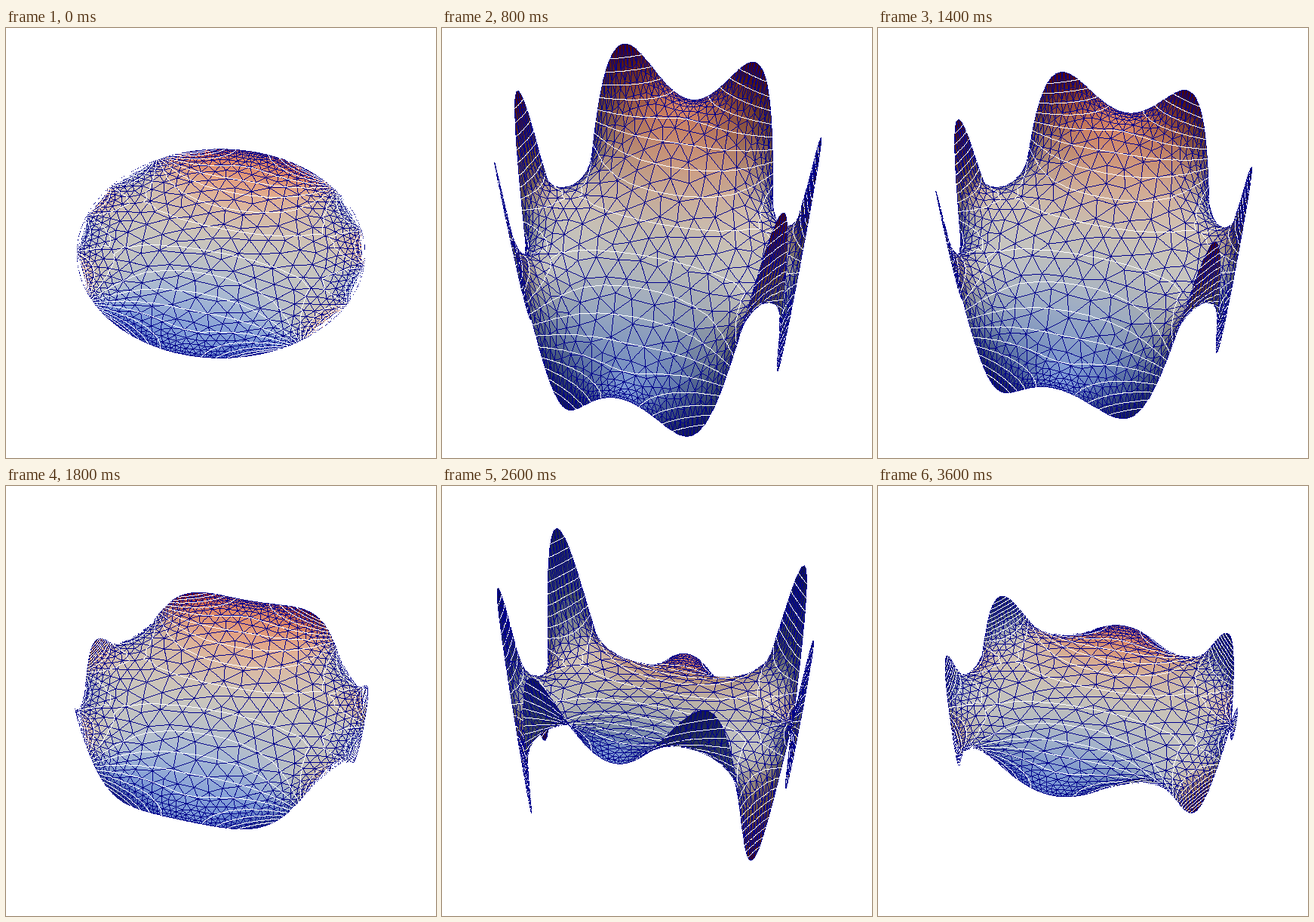
These frames come from a looping animation (570x570 px, 3800 ms). An HTML page with a canvas:

```html
<!DOCTYPE html>
<html>
<head>
<meta charset="utf-8">
<style>
  html, body { margin: 0; width: 100%; height: 100%; overflow: hidden; background: #fff; }
  canvas { display: block; }
</style>
</head>
<body>
<canvas id="stage" width="570" height="570"></canvas>
<script>
const SIZE = 570, STEPS = 19, STEP_MS = 200;
const ctx = document.getElementById('stage').getContext('2d');
const image = ctx.createImageData(SIZE, SIZE);
const pixels = new Uint32Array(image.data.buffer);
const nearness = new Float32Array(SIZE * SIZE);
const rgb = (r, g, b) => (255 << 24 | b << 16 | g << 8 | r) >>> 0;
const WHITE = rgb(255, 255, 255), NAVY = rgb(0, 0, 140);

let seed = 12345;
const random = () => (seed = (seed * 1664525 + 1013904223) % 4294967296) / 4294967296;

const dot = (a, b) => a[0] * b[0] + a[1] * b[1] + a[2] * b[2];
const minus = (a, b) => a.map((t, i) => t - b[i]);
const cross = (a, b) => [
  a[1] * b[2] - a[2] * b[1], a[2] * b[0] - a[0] * b[2], a[0] * b[1] - a[1] * b[0]
];

// Mesh points on jittered rings, finest at the rim; rim points come last.
function diskPoints() {
  const points = [];
  let r = 1;
  while (r > 0.05) {
    const h = Math.min(0.14, 0.025 + 0.3 * (1 - r));
    const n = Math.round(2 * Math.PI * r / h), start = random() * 7;
    const jitter = r === 1 ? 0 : 0.35 * h;
    for (let i = 0; i < n; i++) {
      const a = start + i * 2 * Math.PI / n;
      points.push([
        r * Math.cos(a) + (random() - 0.5) * jitter,
        r * Math.sin(a) + (random() - 0.5) * jitter
      ]);
    }
    r -= 0.87 * h;
  }
  return points.reverse();
}

// Bowyer-Watson Delaunay triangulation.
function triangulate(points) {
  const n = points.length;
  const all = [...points, [-150, -100], [150, -100], [0, 200]];
  const withCircle = (a, b, c) => {
    const [ax, ay] = all[a];
    const bx = all[b][0] - ax, by = all[b][1] - ay;
    const cx = all[c][0] - ax, cy = all[c][1] - ay;
    const d = 2 * (bx * cy - by * cx), bb = bx * bx + by * by, cc = cx * cx + cy * cy;
    const x = (cy * bb - by * cc) / d, y = (bx * cc - cx * bb) / d;
    return { v: [a, b, c], x: ax + x, y: ay + y, rr: x * x + y * y };
  };
  let triangles = [withCircle(n, n + 1, n + 2)];
  for (let p = 0; p < n; p++) {
    const [x, y] = all[p], kept = [], border = new Map();
    for (const t of triangles) {
      if ((x - t.x) ** 2 + (y - t.y) ** 2 >= t.rr) { kept.push(t); continue; }
      t.v.forEach((a, i) => {
        const b = t.v[(i + 1) % 3];
        if (!border.delete(b + ',' + a)) border.set(a + ',' + b, [a, b]);
      });
    }
    for (const [a, b] of border.values()) kept.push(withCircle(a, b, p));
    triangles = kept;
  }
  return triangles.map(t => t.v).filter(v => v.every(i => i < n));
}

// Rim heights sin(2 pi (x + y)) in axes turned by TURN against the view.
const TURN = 30.6 * Math.PI / 180;
const rimHeight = (x, y) => {
  const a = Math.atan2(y, x) - TURN;
  return Math.sin(2 * Math.PI * (Math.cos(a) + Math.sin(a)));
};

const vertices = diskPoints().map(([x, y]) => [x, y, 0]);
const triangles = triangulate(vertices);
const edgeKey = (a, b) => Math.min(a, b) * 10000 + Math.max(a, b);
const edgeIndex = new Map();
for (const v of triangles) v.forEach((a, i) => {
  const key = edgeKey(a, v[(i + 1) % 3]);
  if (!edgeIndex.has(key)) edgeIndex.set(key, edgeIndex.size);
});
const edges = [...edgeIndex.keys()].map(e => [Math.floor(e / 10000), e % 10000]);
const links = vertices.map(() => []);
edges.forEach(([a, b], e) => { links[a].push([b, e]); links[b].push([a, e]); });
const onRim = vertices.map(([x, y]) => Math.hypot(x, y) > 0.99999);

// Even out the inner triangles.
for (let pass = 0; pass < 3; pass++) {
  vertices.forEach((p, i) => {
    if (onRim[i]) return;
    for (const m of [0, 1]) {
      const mean = links[i].reduce((sum, [j]) => sum + vertices[j][m], 0) / links[i].length;
      p[m] += 0.5 * (mean - p[m]);
    }
  });
}

// Minimal surface over the disk: finite elements, reweighted by the slope, with SOR sweeps.
function solveMinimalSurface() {
  vertices.forEach((p, i) => { if (onRim[i]) p[2] = rimHeight(p[0], p[1]); });
  const corners = triangles.flatMap(v => v.map((k, i) => {
    const a = v[(i + 1) % 3], b = v[(i + 2) % 3];
    const [x, y] = vertices[k];
    const ax = vertices[a][0] - x, ay = vertices[a][1] - y;
    const bx = vertices[b][0] - x, by = vertices[b][1] - y;
    const area = Math.abs(ax * by - ay * bx);
    return { edge: edgeIndex.get(edgeKey(a, b)), cot: (ax * bx + ay * by) / area, area };
  }));
  const weights = new Float64Array(edges.length);
  for (let round = 0; round < 120; round++) {
    weights.fill(0);
    triangles.forEach((v, t) => {
      const [a, b, c] = v.map(i => vertices[i]);
      const lifted = Math.hypot(...cross(minus(b, a), minus(c, a)));
      for (let i = 3 * t; i < 3 * t + 3; i++) {
        weights[corners[i].edge] += corners[i].cot * corners[i].area / lifted;
      }
    });
    for (let sweep = 0; sweep < 15; sweep++) {
      for (let i = 0; i < vertices.length; i++) {
        if (onRim[i]) continue;
        let sum = 0, total = 0;
        for (const [j, e] of links[i]) { sum += weights[e] * vertices[j][2]; total += weights[e]; }
        vertices[i][2] += 1.6 * (sum / total - vertices[i][2]);
      }
    }
  }
}
solveMinimalSurface();

// Twenty evenly spaced level lines.
const contours = [];
for (const v of triangles) {
  for (let i = 0; i < 20; i++) {
    const level = -1 + 2 * i / 19, ends = [];
    v.forEach((a, j) => {
      const p = vertices[a], q = vertices[v[(j + 1) % 3]];
      if ((p[2] < level) !== (q[2] < level)) {
        const f = (level - p[2]) / (q[2] - p[2]);
        ends.push(p.map((c, m) => c + f * (q[m] - c)));
      }
    });
    if (ends.length === 2) contours.push(ends);
  }
}

const PALETTE = [
  [59, 76, 192], [98, 130, 234], [141, 176, 254], [184, 208, 249], [221, 221, 221],
  [245, 196, 173], [244, 154, 123], [222, 96, 77], [180, 4, 38]
];
function colorOf(u) {
  const s = Math.max(0, Math.min(7.999, (u + 1) * 4)), i = Math.floor(s);
  return PALETTE[i].map((c, m) => c + (s - i) * (PALETTE[i + 1][m] - c));
}
const colors = vertices.map(p => colorOf(p[2]));

// Lights in camera space: direction, colored intensity.
const LIGHTS = [
  [[0.112, 0.766, 0.633], [0.75, 0.725, 0.68]],
  [[-0.045, -0.966, 0.255], [0.24, 0.24, 0.25]],
  [[0, 0, 1], [0.25, 0.25, 0.245]],
  [[0.94, 0, -0.342], [0.21, 0.21, 0.21]],
  [[-0.94, 0, -0.342], [0.21, 0.21, 0.21]]
];
function lightOn(a, b, c) {
  let n = cross(minus(b, a), minus(c, a));
  const scale = (dot(n, a) > 0 ? -1 : 1) / Math.hypot(...n);
  n = n.map(t => t * scale);
  return [0, 1, 2].map(i =>
    LIGHTS.reduce((sum, [dir, power]) => sum + Math.max(0, dot(n, dir)) * power[i], 0));
}

const ELEVATION = 46 * Math.PI / 180, DISTANCE = 5.62;
const FOCUS = SIZE / 2 / Math.tan(Math.PI / 12);
const SIN = Math.sin(ELEVATION), COS = Math.cos(ELEVATION);
function project([x, y, u], amplitude) {
  const z = u * amplitude, up = y * SIN + z * COS;
  const depth = DISTANCE + y * COS - z * SIN;
  return {
    x: 285 + FOCUS * x / depth, y: 282 - FOCUS * up / depth,
    near: 1 / depth, cam: [x, up, -depth]
  };
}

function plot(x, y, near, color) {
  if (x < 0 || y < 0 || x >= SIZE || y >= SIZE) return;
  const i = y * SIZE + x;
  if (near > nearness[i]) { nearness[i] = near; pixels[i] = color; }
}

function fillTriangle(a, b, c, ca, cb, cc) {
  const area = (b.x - a.x) * (c.y - a.y) - (c.x - a.x) * (b.y - a.y);
  if (!area) return;
  const light = lightOn(a.cam, b.cam, c.cam);
  const x0 = Math.floor(Math.min(a.x, b.x, c.x)), x1 = Math.ceil(Math.max(a.x, b.x, c.x));
  const y0 = Math.floor(Math.min(a.y, b.y, c.y)), y1 = Math.ceil(Math.max(a.y, b.y, c.y));
  for (let y = y0; y <= y1; y++) for (let x = x0; x <= x1; x++) {
    const px = x + 0.5, py = y + 0.5;
    const wb = ((px - a.x) * (c.y - a.y) - (c.x - a.x) * (py - a.y)) / area;
    const wc = ((b.x - a.x) * (py - a.y) - (px - a.x) * (b.y - a.y)) / area;
    const wa = 1 - wb - wc;
    if (wa < 0 || wb < 0 || wc < 0) continue;
    const shade = i => Math.min(255, (wa * ca[i] + wb * cb[i] + wc * cc[i]) * light[i]);
    plot(x, y, wa * a.near + wb * b.near + wc * c.near, rgb(shade(0), shade(1), shade(2)));
  }
}

function drawLine(a, b, color, lift) {
  const dx = b.x - a.x, dy = b.y - a.y;
  const n = Math.max(1, Math.ceil(Math.max(Math.abs(dx), Math.abs(dy))));
  for (let i = 0; i <= n; i++) {
    const f = i / n;
    plot(Math.floor(a.x + f * dx), Math.floor(a.y + f * dy),
         (a.near + f * (b.near - a.near)) * lift, color);
  }
}

function render(amplitude) {
  pixels.fill(WHITE);
  nearness.fill(0);
  const view = vertices.map(p => project(p, amplitude));
  for (const [a, b, c] of triangles) {
    fillTriangle(view[a], view[b], view[c], colors[a], colors[b], colors[c]);
  }
  for (const [a, b] of edges) drawLine(view[a], view[b], NAVY, 1.0015);
  for (const [p, q] of contours) {
    drawLine(project(p, amplitude), project(q, amplitude), WHITE, 1.003);
  }
  ctx.putImageData(image, 0, 0);
}

let shown = -1;
function tick() {
  const step = Math.floor(performance.now() / STEP_MS) % STEPS;
  if (step !== shown) {
    shown = step;
    render(Math.sin(2 * Math.PI * step / STEPS));
  }
  requestAnimationFrame(tick);
}
tick();
</script>
</body>
</html>
```
